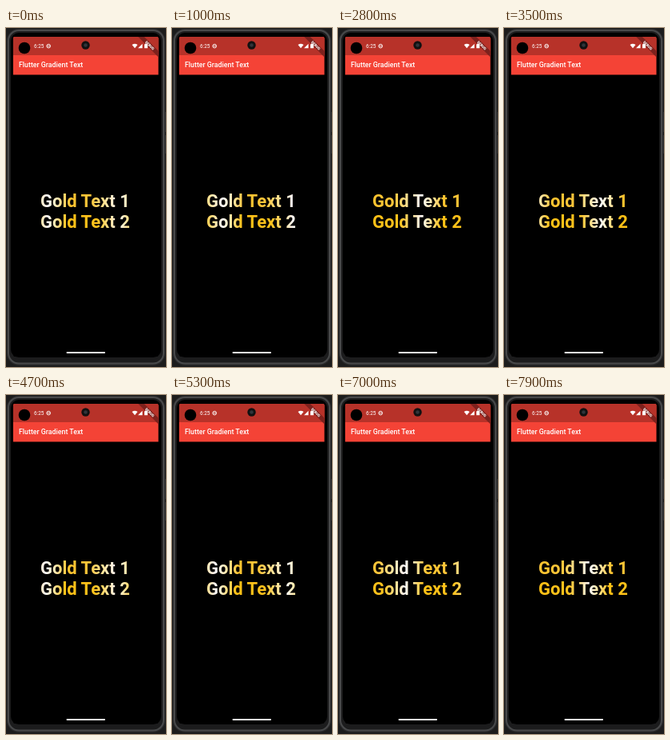
Write an HTML page that moves like this. It is 200 by 424 pixels and loops after 8000 ms.

```html
<!DOCTYPE html>
<html lang="en">
<head>
<meta charset="utf-8">
<title>Gradient text</title>
<style>
  html, body { margin: 0; width: 100%; height: 100%; overflow: hidden; background: #1c1c1c; }
  svg { display: block; width: 200px; height: 424px; }
  text { font-family: Roboto, sans-serif; fill: #fff; }
  .gold { font-size: 22px; font-weight: 700; }
</style>
</head>
<body>
<svg viewBox="0 0 200 424">
  <defs>
    <linearGradient id="shine1" gradientUnits="userSpaceOnUse" x1="0" x2="88" spreadMethod="repeat">
      <stop offset="0" stop-color="#fff"/>
      <stop offset=".14" stop-color="#ffe9b0"/>
      <stop offset=".32" stop-color="#ffc42e"/>
      <stop offset=".62" stop-color="#ffc63a"/>
      <stop offset=".84" stop-color="#ffe7a4"/>
      <stop offset="1" stop-color="#fbf3f6"/>
    </linearGradient>
    <linearGradient id="shine2" gradientUnits="userSpaceOnUse" x1="0" x2="88" spreadMethod="repeat">
      <stop offset="0" stop-color="#fff"/>
      <stop offset=".12" stop-color="#ffe6a0"/>
      <stop offset=".28" stop-color="#ffc115"/>
      <stop offset=".7" stop-color="#ffc21c"/>
      <stop offset=".87" stop-color="#ffe08a"/>
      <stop offset="1" stop-color="#fbf3f3"/>
    </linearGradient>
    <clipPath id="screen"><rect x="9" y="11" width="181.5" height="400" rx="2"/></clipPath>
  </defs>

  <!-- phone body -->
  <path d="M199.3 105v25M199.3 134v23" stroke="#333" stroke-width="1.2"/>
  <rect x="1" y="1" width="198" height="421" rx="15" fill="#2a2a2b"/>
  <rect x="3" y="3" width="194" height="416.5" rx="13" fill="#1c1c1d" stroke="#48494a" stroke-width="2"/>
  <rect x="6" y="6" width="188" height="406" rx="10"/>

  <g clip-path="url(#screen)">
    <rect x="9" y="11" width="182" height="400"/>
    <rect x="9" y="11" width="182" height="47.5" fill="#f44336"/>
    <rect x="9" y="11" width="182" height="23" fill="#b73229"/>
    <g transform="translate(190.5 11) rotate(45)">
      <rect x="-18" y="12.5" width="36" height="5.4" fill="#7d211d"/>
      <text y="16.8" font-size="4.4" font-weight="900" text-anchor="middle">DEBUG</text>
    </g>
  </g>

  <!-- status bar -->
  <circle cx="23" cy="25" r="7.3"/>
  <circle cx="99.5" cy="21.5" r="5.2" fill="#111"/>
  <circle cx="99.5" cy="21.5" r="2.3" fill="#30343a"/>
  <text x="35" y="25" font-size="6.4">6:25</text>
  <g fill="none" stroke="#fff">
    <circle cx="53.2" cy="22.6" r="2.3"/>
    <path d="M51.5 22.6h3.4" stroke-width=".8"/>
  </g>
  <path d="M157.5 21Q161 18.4 164.5 21L161 25.2ZM170.5 19.8V25.2H165ZM173 20.2h1v-.7h2v.7h1v5h-4z" fill="#fff"/>

  <text x="16" y="49.2" font-size="8.8" font-weight="500">Flutter Gradient Text</text>
  <text class="gold" x="43" y="224" style="fill:url(#shine1)">Gold Text 1</text>
  <text class="gold" x="43" y="250" style="fill:url(#shine2)">Gold Text 2</text>
  <rect x="75.5" y="405" width="48.5" height="2" rx="1" fill="#f2f2f2"/>
</svg>
<script>
  const LOOP = 8000, STEP = 100, SWEEP = 5000, WIDTH = 88;
  const shines = document.querySelectorAll('linearGradient');

  // The highlight drifts right by one gradient width per sweep, gently eased.
  function draw(now) {
    const p = Math.floor(now % LOOP / STEP) * STEP / SWEEP;
    const x = 52 + WIDTH * (p - Math.sin(2 * Math.PI * p) / (4 * Math.PI));
    shines.forEach(g => g.setAttribute('gradientTransform', `translate(${x})`));
    requestAnimationFrame(draw);
  }
  draw(performance.now());
</script>
</body>
</html>
```
